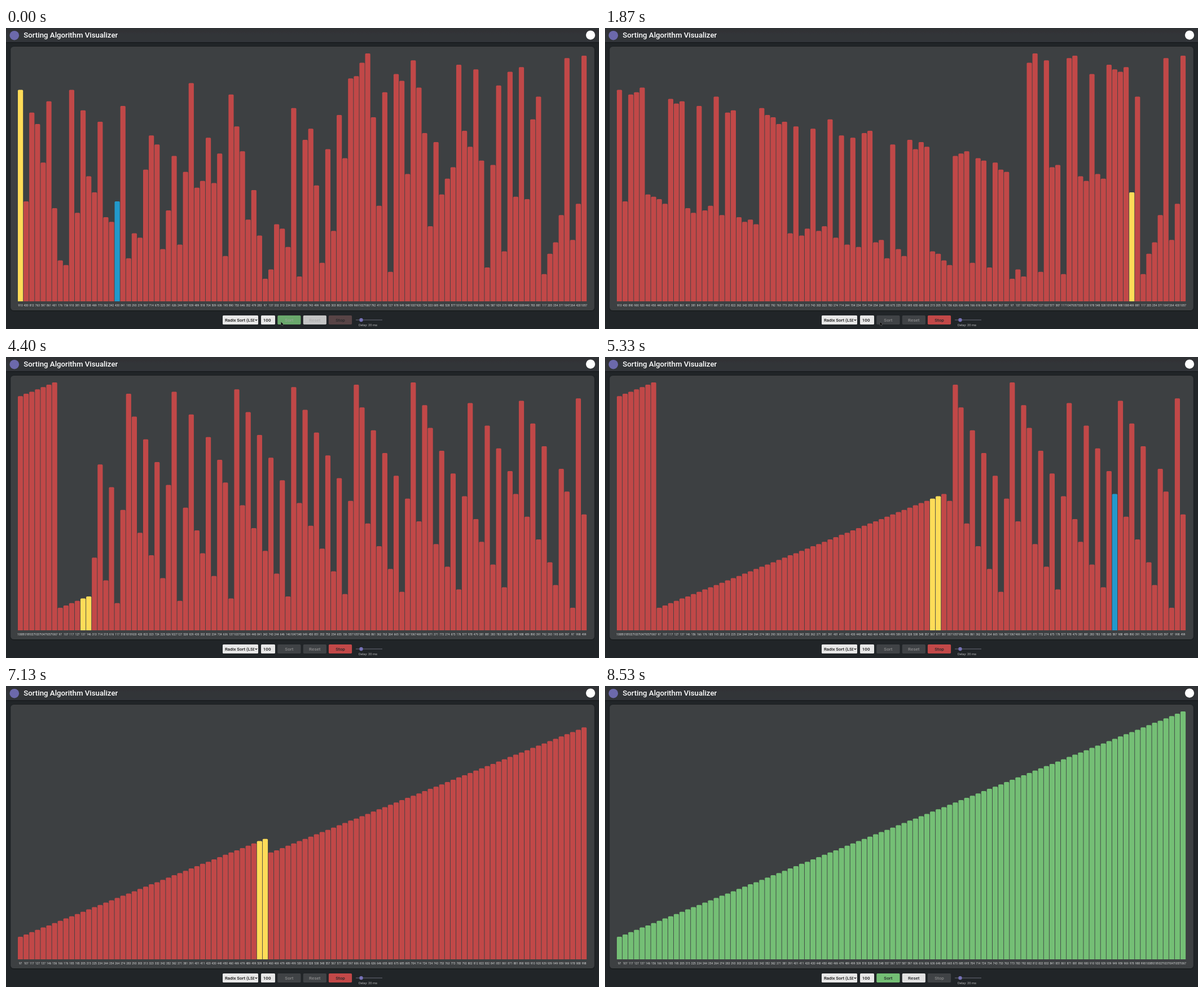
Animation, 1051 px wide and 533 px high, one loop 8.67 s. Source, as an HTML page:

```html
<!DOCTYPE html>
<html lang="en">
<head>
<meta charset="utf-8">
<title>Sorting Algorithm Visualizer</title>
<style>
  html, body { margin: 0; width: 100%; height: 100%; overflow: hidden; background: #212528; }
  svg { display: block; width: 1051px; height: 533px; font-family: Roboto, Arial, sans-serif; }
  .label { font-size: 4.8px; fill: #dcdddd; text-anchor: middle; }
  .button { font-size: 8px; font-weight: 500; text-anchor: middle; }
</style>
</head>
<body>
<svg viewBox="0 0 1051 533">
  <defs>
    <linearGradient id="head" x1="0" y1="0" x2="0" y2="1">
      <stop offset="0" stop-color="#2f3235"/><stop offset="1" stop-color="#33363a"/>
    </linearGradient>
    <filter id="shadow" x="-5%" y="-20%" width="110%" height="150%">
      <feDropShadow dx="0" dy="0.5" stdDeviation="1.3" flood-color="#000" flood-opacity=".55"/>
    </filter>
    <clipPath id="floor"><rect x="8" y="33" width="1035" height="451"/></clipPath>
    <clipPath id="selectClip"><rect x="384" y="509" width="56" height="16"/></clipPath>
  </defs>
  <rect width="1051" height="533" fill="#212528"/>
  <rect width="1051" height="25" fill="url(#head)" filter="url(#shadow)"/>
  <circle cx="14.8" cy="13.2" r="8.3" fill="#6c69ab"/>
  <text x="31.3" y="17.2" font-size="13.25" font-weight="500" fill="#fff">Sorting Algorithm Visualizer</text>
  <circle cx="1036" cy="12.6" r="8.1" fill="#fff"/>
  <rect x="8.3" y="33" width="1034.5" height="467" rx="5.5" fill="#3c3f42" filter="url(#shadow)"/>
  <g id="bars" clip-path="url(#floor)"></g>
  <g id="labels"></g>

  <rect x="384" y="509" width="63" height="16" rx="1.5" fill="#e8e8e8"/>
  <text x="388" y="519.8" font-size="7.8" font-weight="500" fill="#151515" clip-path="url(#selectClip)">Radix Sort (LSD)</text>
  <path d="M441.6 516.2l1.8 1.8 1.8-1.8" fill="none" stroke="#151515" stroke-width="1.1"/>
  <rect x="452" y="509" width="25" height="16" rx="1.5" fill="#e8e8e8"/>
  <text x="455.8" y="519.8" font-size="8" font-weight="500" fill="#151515">100</text>
  <g id="buttons"></g>
  <path d="M620 517H667" stroke="#686b78" stroke-width="1"/>
  <circle cx="629.5" cy="517" r="3.2" fill="#7672b9"/>
  <text x="641.5" y="527.7" font-size="5.8" fill="#b9babb" text-anchor="middle">Delay: 20 ms</text>
  <path id="cursor" d="M487.4 520.2v6.6l1.5-1.4 1 2.2 1-.4-1-2.2h2z" fill="#000" stroke="#aaa" stroke-width=".3"/>
</svg>
<script>
const LOOP = 8670, COUNT = 100, PITCH = 10.09, LEFT = 21, FLOOR = 484, SCALE = 0.4115;
const RED = "#c14848", YELLOW = "#ffdc58", BLUE = "#2299cb", GREEN = "#74bf75";
const FADE = 200, DISABLED = [64, 67, 70];

const shuffled = [
  871, 851, 812, 763, 597, 861, 401, 176, 156, 910, 381, 822, 538, 469, 773, 362, 342, 430, 841, 185,
  293, 274, 567, 714, 675, 225, 391, 626, 244, 557, 939, 489, 518, 704, 509, 636, 195, 890, 753, 646,
  352, 479, 283, 97, 137, 332, 313, 234, 832, 107, 695, 743, 499, 166, 655, 303, 802, 616, 959, 969,
  1027, 1067, 792, 411, 900, 127, 978, 949, 548, 1037, 920, 724, 323, 685, 460, 528, 577, 1018, 734, 665,
  998, 606, 146, 587, 929, 215, 988, 450, 1008, 440, 783, 881, 117, 205, 254, 371, 1047, 264, 420, 1057
];

// passes[p] is the array before digit p is processed (stable sort per digit).
const passes = [shuffled];
for (let p = 0; p < 4; p++) {
  const digit = v => Math.floor(v / 10 ** p) % 10;
  passes.push([...passes[p]].sort((a, b) => digit(a) - digit(b)));
}

// Time in ms against number of the current write; the pace wavers slightly.
const pace = [[0, 1.1], [930, 46.1], [1870, 90.85], [3330, 161.1], [4400, 212.5],
  [6130, 295.5], [7130, 343.32], [8130, 391.4], [8309, 400], [LOOP, 420]];
const doneAt = 8309;

function progress(t) {
  const i = pace.findIndex(([time]) => time > t);
  const [t0, n0] = pace[i - 1], [t1, n1] = pace[i];
  return n0 + (n1 - n0) * (t - t0) / (t1 - t0);
}

function add(parent, tag, attrs) {
  const node = document.createElementNS("http://www.w3.org/2000/svg", tag);
  for (const key in attrs) node.setAttribute(key, attrs[key]);
  return document.getElementById(parent).appendChild(node);
}

const bars = shuffled.map((_, i) =>
  add("bars", "rect", { x: LEFT + i * PITCH, width: 9.2, rx: 1.7 }));
const labels = shuffled.map((_, i) =>
  add("labels", "text", { x: LEFT + 4.6 + i * PITCH, y: 492.6, class: "label" }));

const buttons = [
  { name: "Sort", x: 481.3, color: [116, 191, 117], whileRunning: false },
  { name: "Reset", x: 526.7, color: [226, 226, 226], whileRunning: false },
  { name: "Stop", x: 571.9, color: [194, 72, 72], whileRunning: true }
].map(b => {
  b.box = add("buttons", "rect", { x: b.x, y: 509, width: 41.2, height: 16, rx: 1.7 });
  b.text = add("buttons", "text", { x: b.x + 20.6, y: 519.8, class: "button" });
  b.text.textContent = b.name;
  return b;
});

function drawBars(values, colorOf) {
  values.forEach((v, i) => {
    const h = v * SCALE;
    bars[i].setAttribute("y", FLOOR - h);
    bars[i].setAttribute("height", h + 4);
    bars[i].setAttribute("fill", colorOf(i));
    if (labels[i].textContent !== String(v)) labels[i].textContent = v;
  });
}

function drawSorting(n) {
  const write = Math.floor(n), phase = n - write;
  const pass = Math.floor(write / COUNT), index = write % COUNT;
  const values = passes[pass].map((v, i) => i <= index ? passes[pass + 1][i] : v);
  const reading = phase < 0.2;
  const source = reading ? values.lastIndexOf(values[index]) : -1;
  const recent = reading ? [write - 1, write - 2] : phase < 0.7 ? [write, write - 1] : [write];
  const marked = recent.filter(w => w >= 0).map(w => w % COUNT);
  drawBars(values, i => i === source ? BLUE : marked.includes(i) ? YELLOW : RED);
}

function drawButtons(t) {
  const running = t < doneAt;
  const p = Math.min(1, (running ? t + 36 : t - doneAt) / FADE);
  for (const b of buttons) {
    const enabled = b.whileRunning === running;
    const amount = enabled ? p : 1 - p;
    const rgb = b.color.map((c, i) => Math.round(DISABLED[i] + (c - DISABLED[i]) * amount));
    b.box.setAttribute("fill", `rgb(${rgb})`);
    b.text.setAttribute("fill", enabled ? "#26282a" : "rgba(165,165,165,.7)");
  }
}

function draw(t) {
  if (t < doneAt) drawSorting(progress(t));
  else drawBars(passes[4], () => GREEN);
  drawButtons(t);
  const slide = Math.max(0, t - 2250) * 0.08;
  document.getElementById("cursor").setAttribute("transform", `translate(0 ${slide})`);
}

const start = performance.now();
function tick() {
  draw((performance.now() - start) % LOOP);
  requestAnimationFrame(tick);
}
tick();
</script>
</body>
</html>
```
